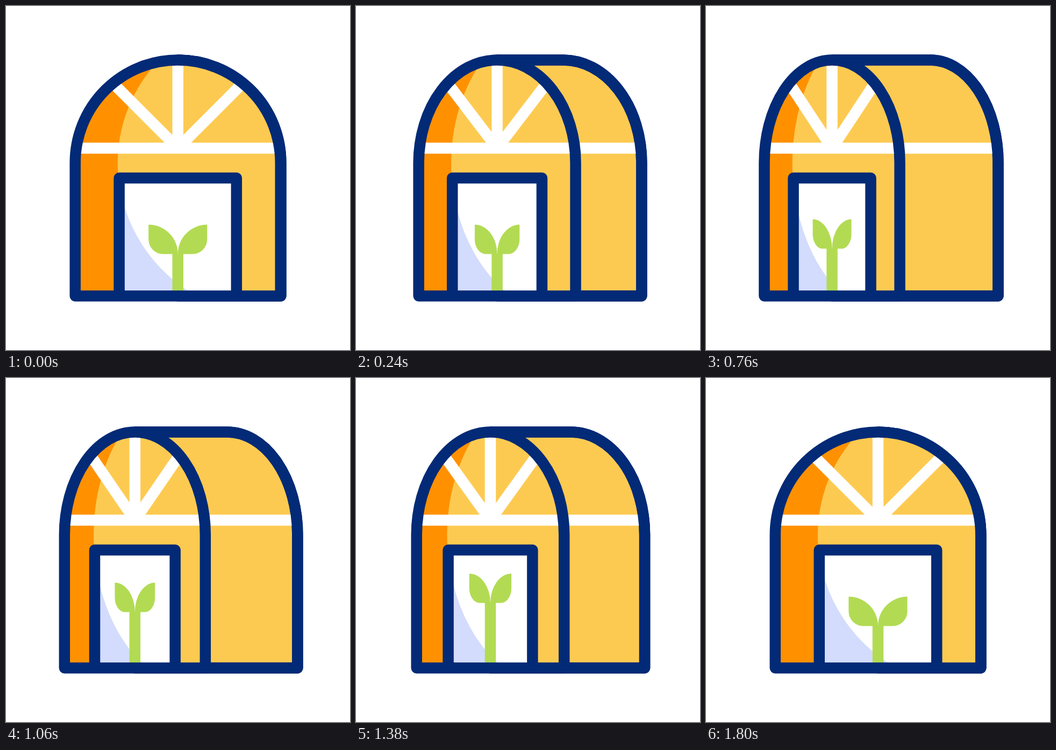
Animation of 640 by 640 pixels, one loop 2.4 s. Source, as an HTML page:

```html
<!DOCTYPE html>
<html lang="en">
<head>
<meta charset="utf-8">
<title>Greenhouse</title>
<style>
  html, body { margin: 0; width: 100%; height: 100%; overflow: hidden; background: #fff; }
  svg { display: block; width: 100vw; height: 100vh; }
  path { vector-effect: non-scaling-stroke; stroke-width: 20.5; }
  .line { fill: none; stroke: #032a76; stroke-linejoin: round; }
  .bar { fill: none; stroke: #fff; }
  .wall { fill: #fdca51; }
  .leaf { fill: #b2db53; }
</style>
</head>
<body>
<svg viewBox="0 0 640 640">
  <path id="back" class="line" style="fill:#fdca51"/>
  <path id="backBar" class="bar"/>
  <path id="backLine" class="line"/>
  <g id="front">
    <path class="wall" d="M128.75 539.5V291.75A191.25 191.25 0 0 1 511.25 291.75V539.5Z"/>
    <path fill="#ff9100" d="M128.75 539.5V291.75A191.25 191.25 0 0 1 281.5 104.4A277 277 0 0 0 209.3 320V539.5Z"/>
    <path class="bar" d="M133 264.5H507M320 264.5V102M320 264.5L200 144.5M320 264.5L440 144.5"/>
    <path fill="#fff" d="M210.75 539.5V320H429.25V539.5Z"/>
    <path fill="#d3dcfd" d="M215 539.5V353A290 290 0 0 0 221 375A290 290 0 0 0 338 529.5V539.5Z"/>
    <path id="stem" fill="none" stroke="#b2db53"/>
    <g id="leaves">
      <path class="leaf" d="M320 461.5H292.7A27.3 27.3 0 0 1 265.4 434.2V406.8A54.6 54.6 0 0 1 320 461.5Z"/>
      <path class="leaf" d="M320 461.5H347.3A27.3 27.3 0 0 0 374.6 434.2V406.8A54.6 54.6 0 0 0 320 461.5Z"/>
    </g>
    <path class="line" d="M210.75 539.5V320H429.25V539.5"/>
    <path class="line" d="M128.75 539.5V291.75A191.25 191.25 0 0 1 511.25 291.75V539.5Z"/>
  </g>
</svg>
<script>
const LOOP = 2400, RADIUS = 191.25, CENTER = 320;
const PEAK = 480;

// [time, horizontal squeeze, sideways shift of the front wall]
const TURN = [
  [PEAK, 0.365, 88.5], [760, 0.341, 85.5], [1060, 0.315, 80.2],
  [1380, 0.283, 70.2], [1560, 0.149, 39.4], [1800, 0, 0]
];
const GROWTH = [[0, 0], [575, 0], [1380, 43], [1560, 24], [1800, 0]];

const el = id => document.getElementById(id);
const setPath = (id, d) => el(id).setAttribute("d", d);

function track(keys, t, column = 1) {
  const next = keys.findIndex(key => key[0] > t);
  if (next < 0) return keys[keys.length - 1][column];
  if (next === 0) return keys[0][column];
  const a = keys[next - 1], b = keys[next];
  return a[column] + (b[column] - a[column]) * (t - a[0]) / (b[0] - a[0]);
}

function draw(t) {
  const rise = t < PEAK ? 1 - Math.pow(1 - t / PEAK, 1.5) : 1;
  const scale = 1 - track(TURN, t) * rise;
  const shift = track(TURN, t, 2) * rise;
  const frontX = CENTER - shift, backX = CENTER + shift * 1.14;
  const right = backX + RADIUS * scale;

  const hull = `M${frontX} 539.5H${right}V291.75` +
    `A${RADIUS * scale} ${RADIUS} 0 0 0 ${backX} 100.5H${frontX}`;
  setPath("back", hull + "Z");
  setPath("backBar", `M${frontX} 264.5H${backX + 187 * scale}`);
  setPath("backLine", hull);
  el("front").setAttribute("transform",
    `matrix(${scale} 0 0 1 ${frontX - CENTER * scale} 0)`);

  const growth = track(GROWTH, t);
  el("leaves").setAttribute("transform", `translate(0 ${-growth})`);
  setPath("stem", `M320 535V${461 - growth}`);
}

const start = performance.now();
function tick() {
  draw((performance.now() - start) % LOOP);
  requestAnimationFrame(tick);
}
tick();
</script>
</body>
</html>
```
